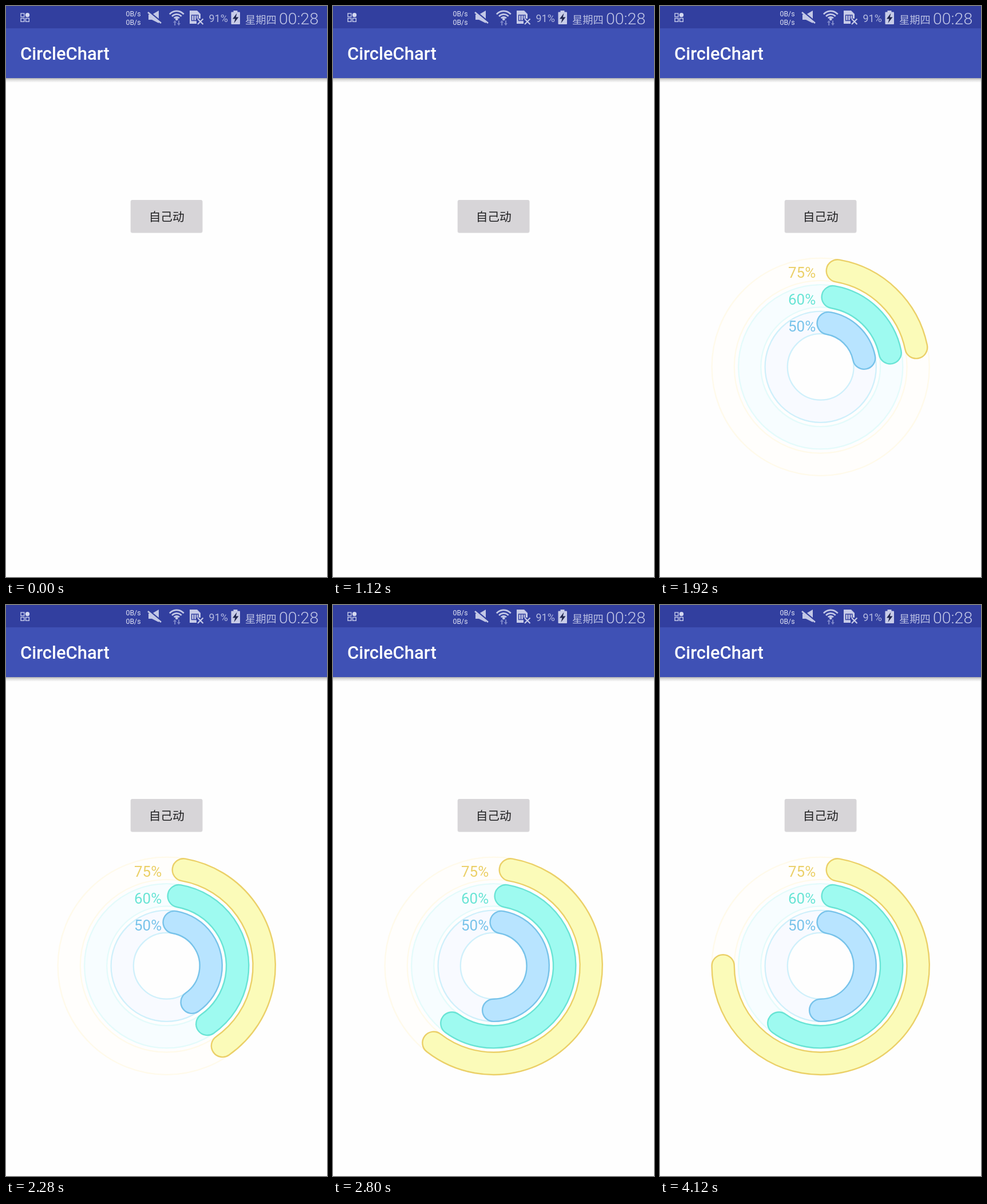
Animation, 561 px wide and 998 px high, one loop 4.16 s. Source, as an HTML page with a canvas:

```html
<!DOCTYPE html>
<html lang="zh-CN">
<head>
<meta charset="utf-8">
<title>CircleChart</title>
<style>
html, body { margin: 0; width: 100%; height: 100%; overflow: hidden; background: #fefefe; }
canvas { display: block; }
</style>
</head>
<body>
<canvas id="stage" width="561" height="998"></canvas>
<script>
const ctx = document.getElementById('stage').getContext('2d');
const LOOP = 4160, STEP = 40, SHOW = 1520;
const CX = 280.7, CY = 630.8, HALF = 19.6, START = 10;
const LATIN = 'Roboto, sans-serif';
const CJK = '"Noto Sans CJK SC", "Noto Sans CJK", sans-serif';

const rings = [
  { r: 170.5, end: 270, label: '75%', y: 475, fill: '#fbfbb9', line: '#ebd068', track: '#fffefc', edge: '#fffaea' },
  { r: 124, end: 216, label: '60%', y: 521.5, fill: '#9efaf0', line: '#69e4d5', track: '#f7fdff', edge: '#e4fbfb' },
  { r: 77.5, end: 180, label: '50%', y: 568.5, fill: '#b8e4ff', line: '#78c3ea', track: '#f8faff', edge: '#cff0fb' }
];

// The sweep slows each time a ring reaches its value: time, angle.
const sweep = [[1530, 10], [1560, 15.3], [1920, 78.4], [2280, 145], [2472, 180], [2768, 216], [3670, 270]];
const press = [[1360, 0], [1520, 1], [1580, 1], [1800, 0]];

function along(points, t) {
  if (t <= points[0][0]) return points[0][1];
  for (let i = 1; i < points.length; i++) {
    const [t0, v0] = points[i - 1], [t1, v1] = points[i];
    if (t <= t1) return v0 + (v1 - v0) * (t - t0) / (t1 - t0);
  }
  return points[points.length - 1][1];
}

function text(str, x, y, font, color, align = 'left') {
  ctx.font = font;
  ctx.fillStyle = color;
  ctx.textAlign = align;
  ctx.fillText(str, x, y);
}

function poly(color, ...pts) {
  ctx.fillStyle = color;
  ctx.beginPath();
  for (let i = 0; i < pts.length; i += 2) ctx.lineTo(pts[i], pts[i + 1]);
  ctx.fill();
}

function rect(color, x, y, w, h, r = 0) {
  ctx.fillStyle = color;
  ctx.beginPath();
  ctx.roundRect(x, y, w, h, r);
  ctx.fill();
}

function line(color, width, x0, y0, x1, y1) {
  ctx.strokeStyle = color;
  ctx.lineWidth = width;
  ctx.beginPath();
  ctx.moveTo(x0, y0);
  ctx.lineTo(x1, y1);
  ctx.stroke();
}

function circle(x, y, r) {
  ctx.beginPath();
  ctx.arc(x, y, r, 0, Math.PI * 2);
}

function gridIcon() {
  ctx.strokeStyle = '#bfc5e8';
  ctx.lineWidth = 1.5;
  for (const [x, y] of [[26, 13], [26, 21.5], [34.5, 21.5]]) ctx.strokeRect(x, y, 5.8, 5.8);
  ctx.fillStyle = '#d4d8f0';
  circle(37.5, 15.8, 3.7);
  ctx.fill();
}

function muteIcon(bar) {
  const c = '#c3c8e6';
  poly(c, 249, 15, 255, 15, 267, 8, 267, 30, 255, 24, 249, 24);
  line(bar, 2.5, 249, 9, 272, 28);
  line(c, 2.8, 248, 11, 271, 30);
}

function wifiIcon() {
  ctx.strokeStyle = '#c3c8e6';
  ctx.lineWidth = 2.7;
  for (const r of [6, 11, 16.5]) {
    ctx.beginPath();
    ctx.arc(298.3, 25.3, r, -Math.PI * 0.77, -Math.PI * 0.23);
    ctx.stroke();
  }
  ctx.fillStyle = '#c3c8e6';
  circle(298.3, 23, 2.4);
  ctx.fill();
  const dim = '#7c86c9';
  poly(dim, 292, 29, 295.2, 25, 298, 29);
  rect(dim, 294.2, 28, 2, 6);
  poly(dim, 299, 30, 305, 30, 302, 34.5);
  rect(dim, 301, 25.5, 2, 5);
}

function simIcon(bar) {
  const c = '#c8cce8';
  poly(c, 321, 8, 334, 8, 340, 14, 340, 31, 321, 31);
  ctx.strokeStyle = bar;
  ctx.lineWidth = 1.4;
  ctx.strokeRect(324.5, 16, 11.5, 9.5);
  line(bar, 1.4, 328.5, 16, 328.5, 26);
  line(bar, 1.4, 332.5, 16, 332.5, 26);
  rect(bar, 333, 22, 12, 11);
  line(c, 2.2, 335, 22.5, 344.5, 32);
  line(c, 2.2, 344.5, 22.5, 335, 32);
}

function batteryIcon() {
  rect('#c8cce8', 397.5, 8, 7, 4);
  rect('#c8cce8', 393.5, 10.5, 15.5, 21.5, 1);
  poly('#20264f', 403.5, 12.5, 396, 22.5, 400.5, 22.5, 398.5, 30, 406.5, 19.5, 401.8, 19.5);
}

function header() {
  const bar = '#323f9f';
  const shade = ctx.createLinearGradient(0, 125, 0, 134);
  shade.addColorStop(0, 'rgba(0,0,0,.36)');
  shade.addColorStop(0.45, 'rgba(0,0,0,.13)');
  shade.addColorStop(1, 'rgba(0,0,0,0)');
  rect(shade, 0, 125, 561, 9);
  rect('#3f51b5', 0, 39, 561, 87);
  rect(bar, 0, 0, 561, 39);
  text('CircleChart', 25, 94, '500 31px ' + LATIN, '#fff');

  gridIcon();
  text('0B/s', 209.5, 18, '12.3px ' + LATIN, '#e1e4f4');
  text('0B/s', 209.5, 32.5, '12.3px ' + LATIN, '#e1e4f4');
  muteIcon(bar);
  wifiIcon();
  simIcon(bar);
  text('91%', 354.5, 28, '18px ' + LATIN, '#b4bae0');
  batteryIcon();
  text('星期四', 418, 31, '300 18.3px ' + CJK, '#b9bfe3');
  text('00:28', 477, 31.5, '300 28.5px ' + LATIN, '#c3c8e8');
}

function button(down) {
  rect('rgba(0,0,0,.09)', 217.5, 339, 126, 58, 3.5);
  const mix = (a, b) => Math.round(a + (b - a) * down);
  rect(`rgb(${mix(215, 197)},${mix(213, 195)},${mix(216, 199)})`, 218, 339, 125.3, 57, 3);
  text('自己动', 280.7, 375.7, '500 20.7px ' + CJK, '#1f1f21', 'center');
}

function track(ring) {
  ctx.lineWidth = 2.3;
  ctx.strokeStyle = ring.edge;
  for (const [r, fill] of [[ring.r + HALF, ring.track], [ring.r - HALF, '#fefefe']]) {
    ctx.fillStyle = fill;
    circle(CX, CY, r);
    ctx.fill();
    ctx.stroke();
  }
}

function band(ring, angle) {
  const rad = deg => (deg - 90) * Math.PI / 180;
  const a = rad(START), b = rad(Math.min(angle, ring.end));
  const at = th => [CX + ring.r * Math.cos(th), CY + ring.r * Math.sin(th)];
  ctx.beginPath();
  ctx.arc(CX, CY, ring.r + HALF, a, b);
  ctx.arc(...at(b), HALF, b, b + Math.PI);
  ctx.arc(CX, CY, ring.r - HALF, b, a, true);
  ctx.arc(...at(a), HALF, a + Math.PI, a + Math.PI * 2);
  ctx.closePath();
  ctx.fillStyle = ring.fill;
  ctx.fill();
  ctx.strokeStyle = ring.line;
  ctx.lineWidth = 2.4;
  ctx.stroke();
}

function chart(t) {
  const angle = along(sweep, t);
  rings.forEach(track);
  for (const ring of rings) {
    band(ring, angle);
    text(ring.label, 224, ring.y, '26px ' + LATIN, ring.line);
  }
}

function draw(now) {
  const t = Math.floor(now % LOOP / STEP) * STEP;
  rect('#fefefe', 0, 0, 561, 998);
  header();
  button(along(press, t));
  if (t >= SHOW) chart(t);
  requestAnimationFrame(tick);
}

let origin = null;
function tick(now) {
  if (origin === null) origin = now;
  draw(Math.max(0, now - origin));
}
requestAnimationFrame(tick);
</script>
</body>
</html>
```
